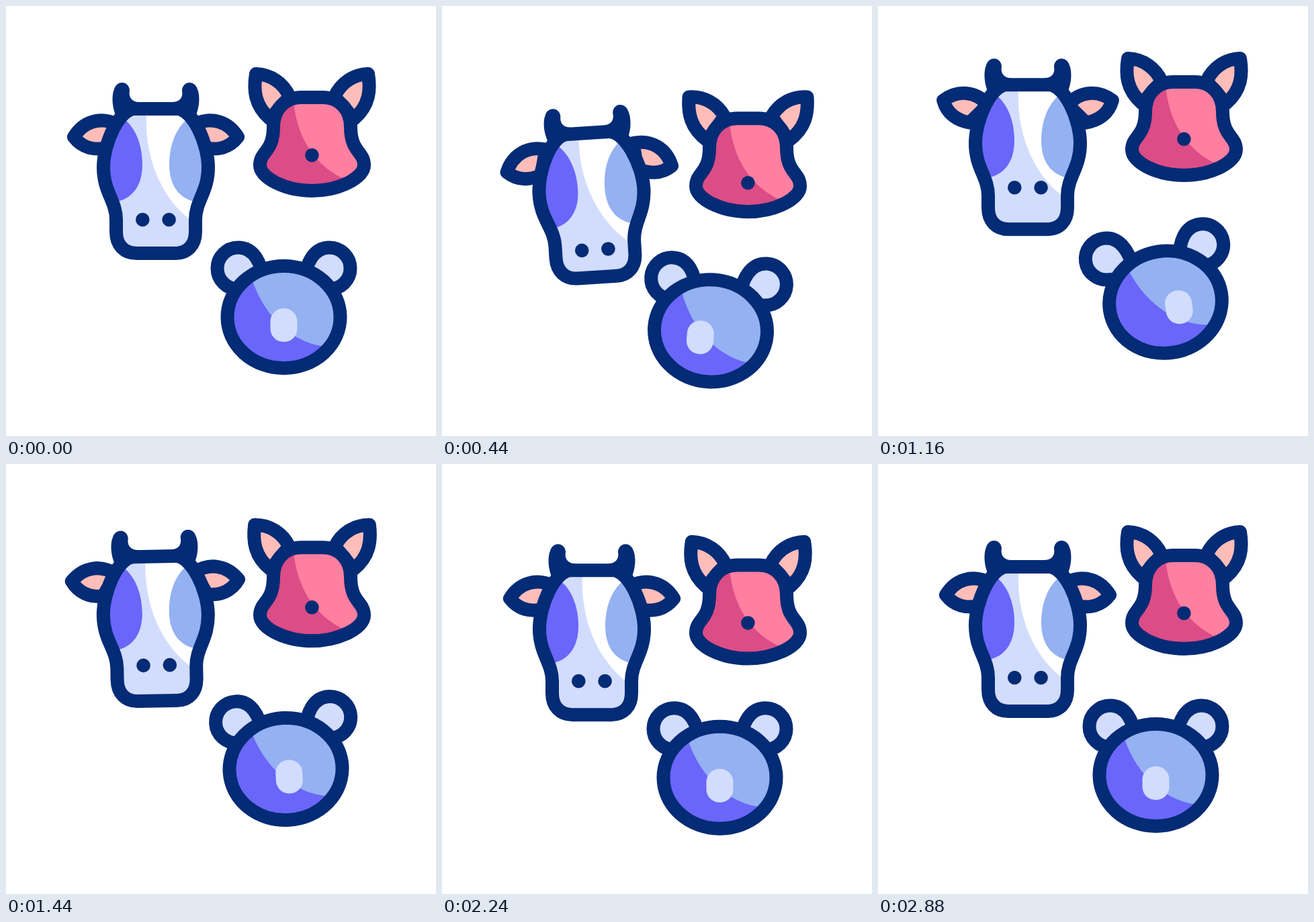
An HTML page for the animation above (3 s loop, 640x640 px).

```html
<!DOCTYPE html>
<html lang="en">
<head>
<meta charset="utf-8">
<title>Animal heads</title>
<style>
  html, body { margin: 0; width: 100%; height: 100%; overflow: hidden; background: #fff; }
  svg { display: block; width: 100vw; height: 100vh; }
  .line { stroke: #042b75; stroke-width: 20; stroke-linejoin: round; stroke-linecap: round; }
  .ink { fill: #042b75; }
  .none { fill: none; }
  .skin { fill: #ffbdb9; }
  .pale { fill: #d2dcfd; }
  .blue { fill: #94b1f2; }
  .violet { fill: #6a66f9; }
  .pink { fill: #ff7fa0; }
  .rose { fill: #dc4c86; }
  .wave { fill: none; stroke: #ffca50; stroke-width: 20; stroke-linecap: round; stroke-linejoin: round; }
</style>
</head>
<body>
<svg viewBox="0 0 640 640">
  <defs>
    <path id="cowHead" d="M192 153H254C278 153 301 205 301 240C301 277 282 290 282 318V336C282 356 270 368 252 368H194C176 368 164 356 164 336V318C164 290 145 277 145 240C145 205 168 153 192 153Z"/>
    <path id="cowEar" class="line skin" d="M165 176C140 164 115 172 101 195C114 212 132 215 150 211Z"/>
    <path id="cowHorn" class="ink" d="M166 168C156 150 158 130 161 124C163 117 168 114 173 114C179 114 184 119 184 126C182 136 188 143 198 143V165H172Z"/>
    <path id="rooHead" d="M440 136H471C497 136 513 155 513 180C513 218 533 216 533 237C533 256 495 275 455.5 275C416 275 378 256 378 237C378 216 398 218 398 180C398 155 414 136 440 136Z"/>
    <path id="rooEar" class="line skin" d="M489 135C498 115 516 102 539 101C543 125 541 148 518 168Z"/>
    <ellipse id="bearHead" cx="413.5" cy="463" rx="84" ry="76"/>
    <path id="bearEar" class="line pale" d="M384 412C380 380 368 359.5 345.5 359.5A31 31 0 0 0 345.5 421.5L380 425Z"/>
    <clipPath id="cowClip"><use href="#cowHead"/></clipPath>
    <clipPath id="rooClip"><use href="#rooHead"/></clipPath>
    <clipPath id="bearClip"><use href="#bearHead"/></clipPath>
  </defs>

  <path class="wave" pathLength="1" d="M149 449C149 466 162 480 183.5 478.5"/>
  <path class="wave" pathLength="1" d="M238 437V460C238 478 250 490 266 490S291 481 293 468"/>

  <g id="cow">
    <g id="cowEarL"><use href="#cowEar"/></g>
    <g transform="matrix(-1 0 0 1 446 0)"><g id="cowEarR"><use href="#cowEar"/></g></g>
    <use href="#cowHorn"/>
    <use href="#cowHorn" transform="matrix(-1 0 0 1 446 0)"/>
    <g clip-path="url(#cowClip)">
      <use href="#cowHead" class="pale"/>
      <path fill="#fff" d="M209 160C206 225 230 285 276 320H310V160Z"/>
      <path class="violet" d="M178 170C195 185 203 210 203 236C203 264 191 285 166 291H140V170Z"/>
      <path class="blue" d="M268 170C251 185 243 210 243 236C243 264 255 285 280 291H306V170Z"/>
    </g>
    <use href="#cowHead" class="line none"/>
    <g id="nostrils" class="ink"><circle cx="203.3" cy="318" r="10.3"/><circle cx="242.6" cy="318" r="10.3"/></g>
  </g>

  <g id="roo">
    <g id="rooEarR"><use href="#rooEar"/></g>
    <g transform="matrix(-1 0 0 1 911 0)"><g id="rooEarL"><use href="#rooEar"/></g></g>
    <g clip-path="url(#rooClip)">
      <use href="#rooHead" class="pink"/>
      <path class="rose" d="M427 130C430 190 455 235 504 258V290H360V130Z"/>
    </g>
    <use href="#rooHead" class="line none"/>
    <circle id="rooNose" class="ink" cx="455.4" cy="222" r="10.3"/>
  </g>

  <g id="bearEars">
    <g id="bearEarL"><use href="#bearEar"/></g>
    <g transform="matrix(-1 0 0 1 827 0)"><g id="bearEarR"><use href="#bearEar"/></g></g>
  </g>
  <g id="bear">
    <g clip-path="url(#bearClip)">
      <use href="#bearHead" class="blue"/>
      <path class="violet" d="M364 400C380 455 420 500 475 507V560H300V400Z"/>
    </g>
    <use href="#bearHead" class="line none"/>
    <rect id="snout" class="pale" x="393.5" y="450" width="40" height="50" rx="19.5"/>
  </g>
</svg>
<script>
const LOOP = 3000;

const ramp = (t, from, to) => Math.min(1, Math.max(0, (t - from) / ((to - from) || 1)));
const ease = u => (1 - Math.cos(Math.PI * u)) / 2;

// A nod: rest, dip, rise (held from riseAt to leaveAt), second dip, rest.
function nod(dipAt, riseAt, leaveAt, dip2At, restAt) {
  return (t, dip, rise, dip2) => {
    if (t < dipAt) return dip * ease(ramp(t, 0, dipAt));
    if (t < leaveAt) return dip + (rise - dip) * ease(ramp(t, dipAt, riseAt));
    if (t < dip2At) return rise + (dip2 - rise) * ease(ramp(t, leaveAt, dip2At));
    return dip2 * (1 - ease(ramp(t, dip2At, restAt)));
  };
}

const travel = nod(460, 1130, 1130, 1860, 2460);
const tilt = nod(460, 1130, 1160, 1800, 2240);
const sway = nod(440, 1000, 1160, 1760, 2240);
const hop = nod(490, 1140, 1140, 2060, 2480);
const flap = nod(600, 1140, 1140, 1900, 2300);

function place(id, x, y, turn = 0, cx = 0, cy = 0) {
  document.getElementById(id).setAttribute("transform", `translate(${x} ${y}) rotate(${turn} ${cx} ${cy})`);
}

function drawCow(t) {
  const turn = tilt(t, -3.6, 0, -2.6);
  const ear = tilt(t, 14, -22, 14);
  const spread = -Math.abs(ear) * 0.25;
  place("cow", 0, travel(t, 36, -36, 17.5), turn, 223, 249);
  place("cowEarL", spread, 0, -ear - turn, 150, 190);
  place("cowEarR", spread, 0, -ear + turn, 150, 190);
  place("nostrils", 0, tilt(t, 9, -12, 10));
}

function drawRoo(t) {
  const ear = flap(t, 6.5, 0, 6.5);
  place("roo", 0, hop(t, 32, -23, 24));
  for (const id of ["rooEarL", "rooEarR"]) place(id, 0, 0, ear, 508, 150);
  place("rooNose", 0, sway(t, 10, -1, 8));
}

function drawBear(t) {
  const y = travel(t, 20.5, -22.5, 12.5);
  const turn = sway(t, 4, -9, 3.7);
  const spread = -Math.abs(turn) * 0.5;
  const nose = tilt(t, -15, 18.5, -16.5);
  place("bear", sway(t, -13.5, 14.5, -11), y, turn, 413.5, 463);
  place("bearEars", sway(t, -1.5, -2, 0.5), y + spread / 2, turn * 0.93, 413.5, 390.5);
  for (const id of ["bearEarL", "bearEarR"]) place(id, spread, 0);
  place("snout", nose, -Math.abs(nose) * 0.08);
}

const waves = document.querySelectorAll(".wave");

function drawWaves(t) {
  const head = ramp(t, 1560, 1720), tail = ramp(t, 1800, 1960);
  for (const wave of waves) {
    wave.style.visibility = head > tail ? "visible" : "hidden";
    wave.style.strokeDasharray = `${head - tail} 2`;
    wave.style.strokeDashoffset = -tail;
  }
}

const start = performance.now();
function tick() {
  const t = (performance.now() - start) % LOOP;
  for (const draw of [drawCow, drawRoo, drawBear, drawWaves]) draw(t);
  requestAnimationFrame(tick);
}
tick();
</script>
</body>
</html>
```
